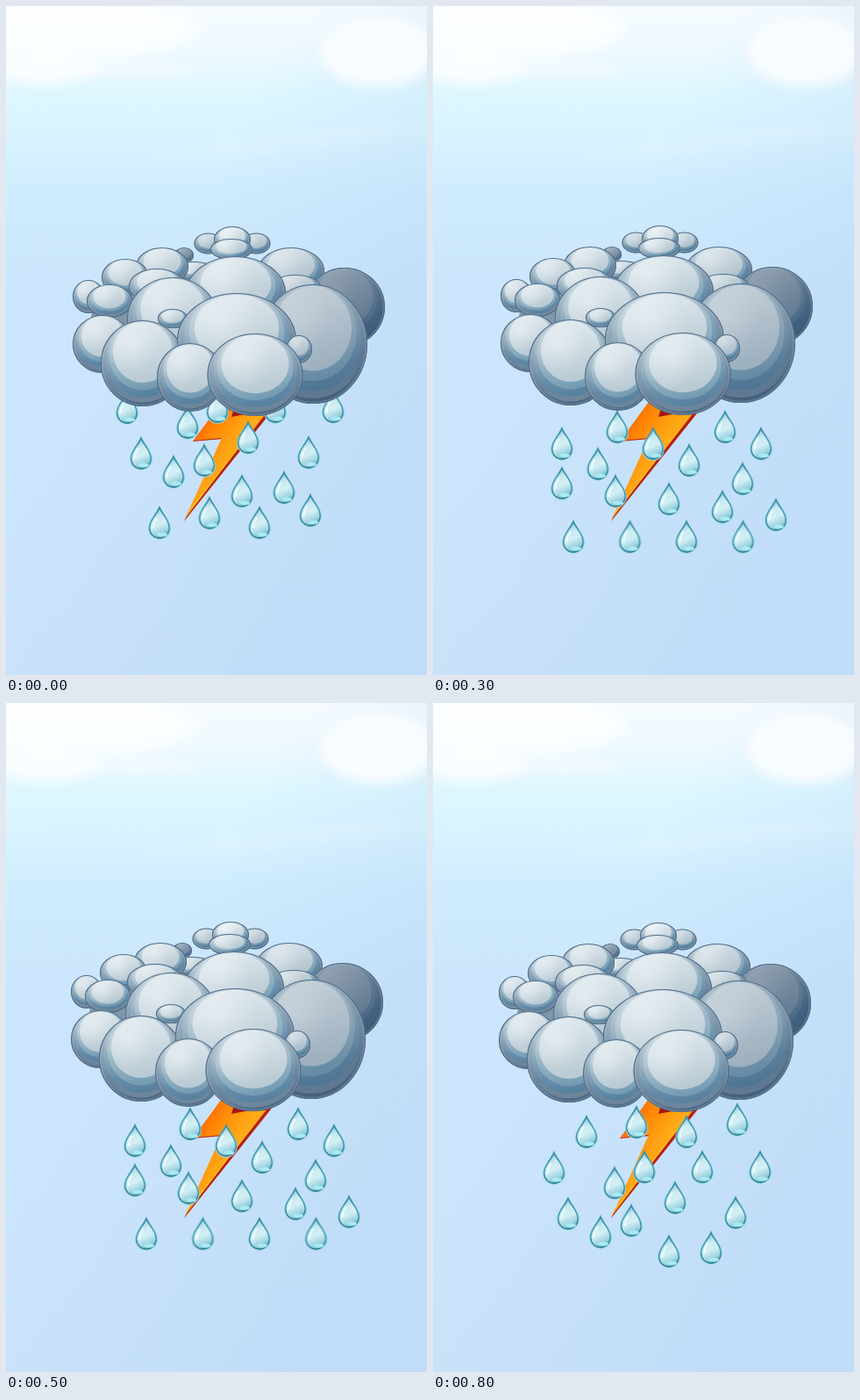
These frames come from a looping animation (480 by 762 pixels, 0.9 s). An HTML page with a canvas:

```html
<!DOCTYPE html>
<html lang="en">
<head>
<meta charset="utf-8">
<title>Thunderstorm</title>
<style>
  html, body { margin: 0; width: 100%; height: 100%; overflow: hidden; background: #cce5fb; }
  canvas { display: block; width: 100vw; height: 100vh; }
</style>
</head>
<body>
<canvas id="stage" width="480" height="762"></canvas>
<script>
const W = 480, H = 762, STEP = 100, GROUND = 620;
const ctx = document.getElementById('stage').getContext('2d');

// Evenly spaced drop tips; the height climbs by dy and starts over every `cycle` drops.
const row = (count, x, dx, y, dy = 0, cycle = count) =>
  Array.from({ length: count }, (_, i) => [x + i * dx, y + (i % cycle) * dy]);

const shower = [
  ...row(4, 138, 69, 438, 17), ...row(3, 241, 66, 437), ...row(2, 154, 72, 490, 8),
  ...row(3, 191, 78, 511, 22), ...row(1, 317, 0, 529), ...row(3, 175, 57, 569, -11, 2)
];
const drizzle = [
  ...row(2, 139, 41, 462, 23), ...row(5, 202, 41, 443, 19, 3), ...row(1, 345, 0, 502),
  ...row(5, 139, 61, 507, 9), ...row(4, 152, 64.5, 568)
];
// Drops that would reach the ground start again below the cloud.
const showerFallen = shower.map(([x, y]) => [x, y + 72 > GROUND ? y - 100 : y + 72]);
const drizzleFallen = drizzle.map(([x, y]) => [x + 8, y + 17]);

// The cloud swings right, then left, and rises with the distance from its rest.
const SWAY = [0, 7, 8, 1, 0, -2, -8, -9, -1];

function rainAt(step) {
  if (step === 0 || step === 7) return shower;
  if (step === 8) return showerFallen;
  return step % 2 ? drizzleFallen : drizzle;
}

// Main balls, back to front: centre and radii.
const BALLS = [
  [257,277,24,12], [214,301,24,10], [178,297,30,22], [136,309,27,21], [94,331,18,19],
  [172,319,32,20], [118,336,26,19], [325,302,38,27], [386,343,46,45], [330,322,30,16],
  [110,385,34,33], [262,327,57,42], [190,357,52,48], [190,356,17,11], [350,385,62,68],
  [156,407,48,49], [263,381,68,54], [334,391,15,16], [210,423,38,39], [284,420,54.5,47]
];

function gradient(c, x0, y0, x1, y1, colors) {
  const g = c.createLinearGradient(x0, y0, x1, y1);
  colors.forEach((color, i) => g.addColorStop(i / (colors.length - 1), color));
  return g;
}

function ovalPath(c, x, y, rx, ry) {
  c.beginPath();
  c.ellipse(x, y, rx, ry, 0, 0, Math.PI * 2);
}

function oval(c, x, y, rx, ry, fill) {
  ovalPath(c, x, y, rx, ry);
  c.fillStyle = fill;
  c.fill();
}

function ring(c, x, y, rx, ry, color) {
  ovalPath(c, x, y, rx, ry);
  c.strokeStyle = color;
  c.lineWidth = 1.2;
  c.stroke();
}

function shape(c, path, fill) {
  c.fillStyle = fill;
  c.fill(new Path2D(path));
}

function layer(w, h, paint) {
  const canvas = document.createElement('canvas');
  canvas.width = w;
  canvas.height = h;
  paint(canvas.getContext('2d'));
  return canvas;
}

function paintSky(c) {
  const g = c.createLinearGradient(0, 0, 0, H);
  [[0, '#f6fbff'], [.07, '#edf9ff'], [.13, '#def7ff'], [.2, '#d8f3ff'], [.27, '#d0ecff'],
   [.42, '#cbe6fc'], [1, '#cbe4fb']].forEach(([at, color]) => g.addColorStop(at, color));
  c.fillStyle = g;
  c.fillRect(0, 0, W, H);
  c.fillStyle = gradient(c, 150, 330, 480, 520, ['rgba(182,212,242,0)', 'rgba(182,212,242,.5)']);
  c.fillRect(0, 0, W, H);
  const puff = (x, y, rx, ry, alpha) => oval(c, x, y, rx, ry, `rgba(253,254,255,${alpha})`);
  c.filter = 'blur(7px)';
  puff(70, 25, 150, 38, .85);
  puff(45, 70, 60, 19, .85);
  puff(425, 52, 66, 40, .85);
  puff(150, 72, 75, 7, .6);
  for (let i = 0; i < 4; i++) puff(430 - i * 65, 140 + i * 9, 80, 4, .25);
  c.filter = 'none';
}

function paintBall(c, [x, y, rx, ry], dark) {
  const part = (dy, size, colors) => oval(c, x, y + dy * ry, rx * size, ry * size,
    gradient(c, x - rx * .2, y - ry, x + rx * .2, y + ry, colors));
  c.save();
  ovalPath(c, x, y, rx, ry);
  c.clip();
  part(0, 1, ['#b4c6d2', '#93a8ba', '#6d869f', '#47637f']);
  part(-.03, .94, ['#bacbd6', '#94abbc', '#6c889f', '#72899e']);
  part(-.09, .88, ['#c2d2db', '#9cb5c5', '#6791ae', '#4f7c9a']);
  part(-.18, .8, ['#cddce3', '#adc4d0', '#85aabf', '#5f8dab']);
  part(-.26, .71, ['#e9f2f5', '#d6e2e8', '#c2d2da', '#a9c9d6']);
  const glow = c.createRadialGradient(x - rx * .3, y - ry * .45, 0, x - rx * .3, y - ry * .45, rx * .65);
  glow.addColorStop(0, 'rgba(248,252,253,.5)');
  glow.addColorStop(1, 'rgba(248,252,253,0)');
  oval(c, x, y, rx, ry, glow);
  oval(c, x, y, rx, ry, gradient(c, x - rx, y - ry, x + rx, y + ry,
    [`rgba(72,94,121,${dark})`, `rgba(42,70,103,${dark * 1.5})`]));
  c.restore();
  ring(c, x, y, rx - 1.7, ry - 1.7, 'rgba(205,222,232,.25)');
  ring(c, x, y, rx - .5, ry - .5, '#516f8b');
}

function paintCloud(c) {
  oval(c, 245, 355, 148, 58, '#8296aa');
  // Small puffs along the crest, darkest at the left.
  for (const i of [0, 1, 3, 2]) {
    const off = Math.abs(i - 2);
    paintBall(c, [203 + i * 27.5, 266 + off * off * 4.5, 21 - off * 5, 15 - off * 3], off * off * .1);
  }
  // Balls to the right lie in shade.
  for (const ball of BALLS) paintBall(c, ball, .04 + .45 * (Math.max(0, ball[0] - 300) / 86) ** 2);
}

function paintBolt(c) {
  shape(c, 'M258 435 L246 452 L213 496 L248 493 L203 587 L305 459 L280 440Z', '#b8200f');
  shape(c, 'M256 435 L245 452 L214 495 L246 492 L204 584 L296 463 L275 440Z',
    gradient(c, 220, 475, 278, 512, ['#ff6a00', '#ff8d08', '#ffa514', '#ffb81f']));
  c.strokeStyle = '#ffc936';
  c.stroke(new Path2D('M296 464 L208 576'));
  shape(c, 'M262 452 L270 460 L305 459 L257 468Z', '#a51510');
}

function dropPath(inset) {
  const r = 12.8 - inset, tip = inset * 1.8;
  return new Path2D(`M0 ${tip} C3.5 ${9 + inset} ${r} 17 ${r} 26
    A${r} ${r} 0 0 1 ${-r} 26 C${-r} 17 -3.5 ${9 + inset} 0 ${tip}Z`);
}

function paintDrop(c) {
  c.translate(15, 1);
  shape(c, dropPath(0), gradient(c, 0, 0, 0, 39, ['#3d93aa', '#6cbfd1', '#9fdde8']));
  shape(c, dropPath(1.1), gradient(c, 0, 0, 0, 39, ['#2f869f', '#3d9ab2', '#1d6d88']));
  shape(c, dropPath(2.3), gradient(c, -8, 6, 6, 38,
    ['#8cc9d9', '#c9e9f1', '#d4eff5', '#9ed4e1', '#438da6']));
  oval(c, 3, 33, 6, 2.6, '#a9e9f1');
  c.strokeStyle = 'rgba(246,255,255,.85)';
  c.lineWidth = 1.8;
  c.stroke(new Path2D('M-3 14 Q-7 19 -7.5 26'));
}

const sky = layer(W, H, paintSky);
const cloud = layer(W, H, paintCloud);
const bolt = layer(W, H, paintBolt);
const drop = layer(30, 42, paintDrop);

function draw(step) {
  const sway = SWAY[step];
  ctx.drawImage(sky, 0, 0);
  ctx.drawImage(bolt, 0, 0);
  for (const [x, y] of rainAt(step)) ctx.drawImage(drop, x - 15, y - 1);
  ctx.drawImage(cloud, sway, -Math.abs(sway));
}

const start = performance.now();
let shown = -1;
function tick() {
  const step = Math.floor((performance.now() - start) / STEP) % SWAY.length;
  if (step !== shown) draw(shown = step);
  requestAnimationFrame(tick);
}
tick();
</script>
</body>
</html>
```
